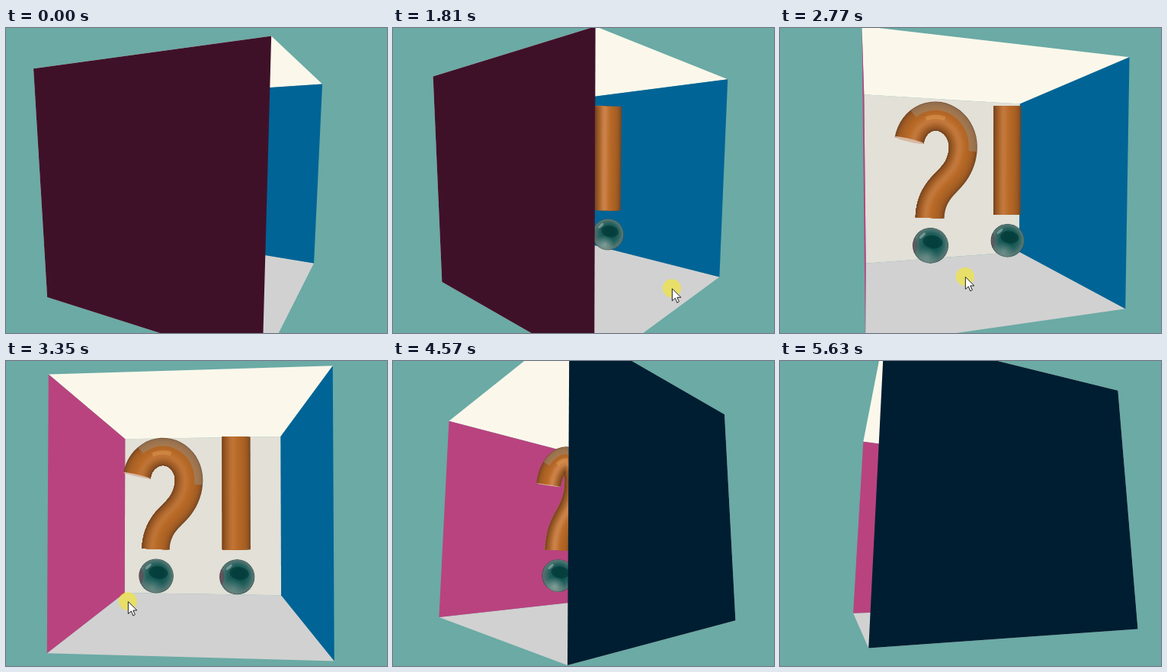
An HTML page with a canvas for the animation above (5.81 s loop, 500 by 400 pixels).

```html
<!DOCTYPE html>
<html lang="en">
<head>
<meta charset="utf-8">
<title>Open box</title>
<style>
html, body { margin: 0; width: 100%; height: 100%; overflow: hidden; background: #6baaa5; }
canvas { display: block; }
</style>
</head>
<body>
<canvas id="stage" width="500" height="400"></canvas>
<script>
const ctx = document.getElementById('stage').getContext('2d');
const LOOP = 5810, ENTER = 110, REST = 610, PRESS = 710, LEAVE = 4550, RELEASE = 5630;
const FOCAL = 449, DIST = 1.692, CX = 249.8, CY = 201.5;
const RAD_PER_PX = 0.2505 * Math.PI / 180;

// Drag waypoints: time and pointer x.
const DRAG = [[PRESS, 424], [1350, 421], [1810, 366], [2770, 243],
  [3350, 160], [3990, 55], [4570, -18], [RELEASE, -100]];
const secants = DRAG.slice(1).map((p, i) => (p[1] - DRAG[i][1]) / (p[0] - DRAG[i][0]));
// Harmonic mean of neighbouring speeds keeps the motion free of overshoot.
const speeds = DRAG.map((p, i) => {
  const a = secants[Math.max(i - 1, 0)], b = secants[Math.min(i, secants.length - 1)];
  return 2 * a * b / (a + b);
});

function dragX(t) {
  t = Math.min(Math.max(t, PRESS), RELEASE);
  let i = 0;
  while (i < DRAG.length - 2 && t > DRAG[i + 1][0]) i++;
  const [t0, x0] = DRAG[i], [t1, x1] = DRAG[i + 1];
  const span = t1 - t0, u = (t - t0) / span, v = 1 - u;
  return v * v * (1 + 2 * u) * x0 + u * u * (3 - 2 * u) * x1 +
    span * u * v * (v * speeds[i] - u * speeds[i + 1]);
}

// The hand sweeps along one shallow arc.
const sweepY = x => 292.3 + 0.1486 * x - 4e-5 * x * x;

function pointerAt(t) {
  const x = dragX(t), left = Math.max(0, 1 - (t - ENTER) / (REST - ENTER));
  return [x - 8 * left + 10 * Math.sin(Math.PI * left), sweepY(x) + 54 * left * left];
}

let sinY, cosY, sinP, cosP, eye;

function setPose(t) {
  const x = dragX(t);
  const yaw = RAD_PER_PX * (x - 175.5), pitch = RAD_PER_PX * (sweepY(x) - 318);
  sinY = Math.sin(yaw); cosY = Math.cos(yaw);
  sinP = Math.sin(pitch); cosP = Math.cos(pitch);
  eye = [-DIST * cosP * sinY, DIST * sinP];
}

function project([x, y, z]) {
  const side = x * cosY + z * sinY, ahead = z * cosY - x * sinY;
  const up = y * cosP - ahead * sinP;
  const scale = FOCAL / (DIST - y * sinP - ahead * cosP);
  return { x: CX + side * scale, y: CY - up * scale, scale };
}

function polygon(points, fill) {
  ctx.beginPath();
  points.forEach(p => ctx.lineTo(p.x, p.y));
  ctx.closePath();
  ctx.fillStyle = fill;
  ctx.fill();
}

// One face of the unit cube, perpendicular to the given axis.
function face(axis, at, fill) {
  const corners = [[-1, -1], [1, -1], [1, 1], [-1, 1]].map(([a, b]) => {
    const p = [a / 2, b / 2];
    p.splice(axis, 0, at);
    return project(p);
  });
  polygon(corners, fill);
}

const TUBE_R = 0.069, BALL_R = 0.0866, BALL_Y = -0.305, SPACING = 0.2;
const BAR = [[0.197, 0.382, 0], [0.197, -0.171, 0]];
const HOOK = hookLine();

// An arch over the top, then an S-bend down to the foot.
function hookLine() {
  const unit = (x, y) => [(x - CX) / 265.7, (CY - y) / 265.7, 0];
  const line = [], steps = 24;
  for (let i = 0; i < steps; i++) {
    const a = Math.PI * 170 / 180 * (1 - i / steps);
    line.push(unit(205 + 35 * Math.cos(a), 156 - 38 * Math.sin(a)));
  }
  for (let i = 0; i <= steps; i++) {
    const t = i / steps, s = 1 - t;
    const bend = s * s * (1 + 2 * t);
    line.push(unit(196 + 44 * bend, 156 + 91 * t + 4 * Math.sin(2 * Math.PI * t)));
  }
  return line;
}

function ribs(line) {
  const pts = line.map(project);
  return pts.map((p, i) => {
    const a = pts[Math.max(i - 1, 0)], b = pts[Math.min(i + 1, pts.length - 1)];
    const r = TUBE_R * p.scale / Math.hypot(b.x - a.x, b.y - a.y);
    return { x: p.x, y: p.y, nx: (a.y - b.y) * r, ny: (b.x - a.x) * r };
  });
}

function strip(rows, from, to, fill) {
  const edge = u => rows.map(p => ({ x: p.x + p.nx * u, y: p.y + p.ny * u }));
  polygon([...edge(from), ...edge(to).reverse()], fill);
}

// Copper: darker towards the rims, with a soft streak that grows as the box turns.
function copper(u) {
  const round = Math.sqrt(1 - u * u);
  const streak = Math.exp(-(((u - 0.3) / 0.3) ** 2)) * (0.35 + 0.65 * Math.abs(sinY));
  return `rgb(${98 + 84 * round + 30 * streak},${58 + 46 * round + 34 * streak},${32 + 5 * round + 44 * streak})`;
}

function tube(rows) {
  const bands = 28;
  for (let i = 0; i < bands; i++) {
    const u = -1 + 2 * i / bands;
    strip(rows, u, 1, copper(u + 1 / bands));
  }
}

function hook() {
  const rows = ribs(HOOK);
  tube(rows);
  strip(rows.slice(6, 26), -0.97, -0.4, 'rgba(158,142,122,.5)');
  strip(rows.slice(8, 15), -0.1, 0.2, 'rgba(226,160,88,.45)');
  openEnd(HOOK[0], HOOK[1]);
}

function openEnd(center, next) {
  const dx = center[0] - next[0], dy = center[1] - next[1], len = Math.hypot(dx, dy);
  if (dx * (eye[0] - center[0]) + dy * (eye[1] - center[1]) <= 0) return;
  const rim = Array.from({ length: 28 }, (_, i) => {
    const a = i / 14 * Math.PI, r = TUBE_R * Math.cos(a) / len;
    return project([center[0] - dy * r, center[1] + dx * r, TUBE_R * Math.sin(a)]);
  });
  polygon(rim, '#d9b7a2');
}

function ellipse(x, y, rx, ry, fill, turn = 0) {
  ctx.beginPath();
  ctx.ellipse(x, y, rx, ry, turn, 0, Math.PI * 2);
  ctx.fillStyle = fill;
  ctx.fill();
}

function ball(x) {
  const p = project([x, BALL_Y, 0]), r = BALL_R * p.scale, turn = Math.abs(sinY);
  ctx.save();
  ctx.translate(p.x, p.y);
  ctx.scale(r, r);
  ctx.beginPath();
  ctx.arc(0, 0, 1, 0, Math.PI * 2);
  ctx.clip();
  const glass = ctx.createRadialGradient(0.12, -0.15, 0.3, 0, 0, 1);
  glass.addColorStop(0, '#0a4f4c');
  glass.addColorStop(0.45, '#24605d');
  glass.addColorStop(0.9, '#587874');
  glass.addColorStop(1, '#344c4b');
  ellipse(0, 0, 1, 1, glass);
  const sheen = ctx.createRadialGradient(-0.2, 0.65, 0, -0.2, 0.65, 0.6);
  sheen.addColorStop(0, `rgba(165,182,176,${0.3 + 0.5 * turn})`);
  sheen.addColorStop(1, 'rgba(165,182,176,0)');
  ellipse(0, 0, 1, 1, sheen);
  ellipse(0.12, -0.2, 0.55, 0.36, 'rgba(4,58,55,.7)', 0.15);
  ellipse(-0.9, 0, 0.16, 0.45, `rgba(110,50,72,${0.5 * (1 - turn)})`);
  ellipse(-0.45, -0.55, 0.22, 0.08, 'rgba(190,205,200,.45)', -0.75);
  ctx.restore();
}

function pointer([x, y], pressed) {
  if (pressed) ellipse(x, y, 12, 12, 'rgba(255,238,0,.5)');
  ctx.save();
  ctx.translate(x + 0.5, y + 0.5);
  ctx.beginPath();
  for (const [px, py] of [[0, 0], [0, 16], [4, 12.5], [6.5, 18.5], [9, 17], [6.5, 11.5], [11.5, 11.5]])
    ctx.lineTo(px, py);
  ctx.closePath();
  ctx.fillStyle = '#fff';
  ctx.fill();
  ctx.strokeStyle = '#222';
  ctx.lineWidth = 1;
  ctx.stroke();
  ctx.restore();
}

function draw(t) {
  setPose(t);
  ctx.fillStyle = '#6baaa5';
  ctx.fillRect(0, 0, 500, 400);

  const outsideLeft = eye[0] < -0.5, outsideRight = eye[0] > 0.5;
  face(2, -0.5, '#e2e0d7');
  face(1, 0.5, '#fbf8eb');
  face(1, -0.5, '#d1d1d1');
  if (!outsideLeft) face(0, -0.5, '#b9437f');
  if (!outsideRight) face(0, 0.5, '#006496');

  ball(-SPACING);
  hook();
  ball(SPACING);
  tube(ribs(BAR));

  if (outsideLeft) face(0, -0.5, '#3f1129');
  if (outsideRight) face(0, 0.5, '#001e31');

  if (t >= ENTER && t < LEAVE) pointer(pointerAt(t), t >= PRESS);
}

const start = performance.now();
function tick() {
  draw((performance.now() - start) % LOOP);
  requestAnimationFrame(tick);
}
tick();
</script>
</body>
</html>
```
